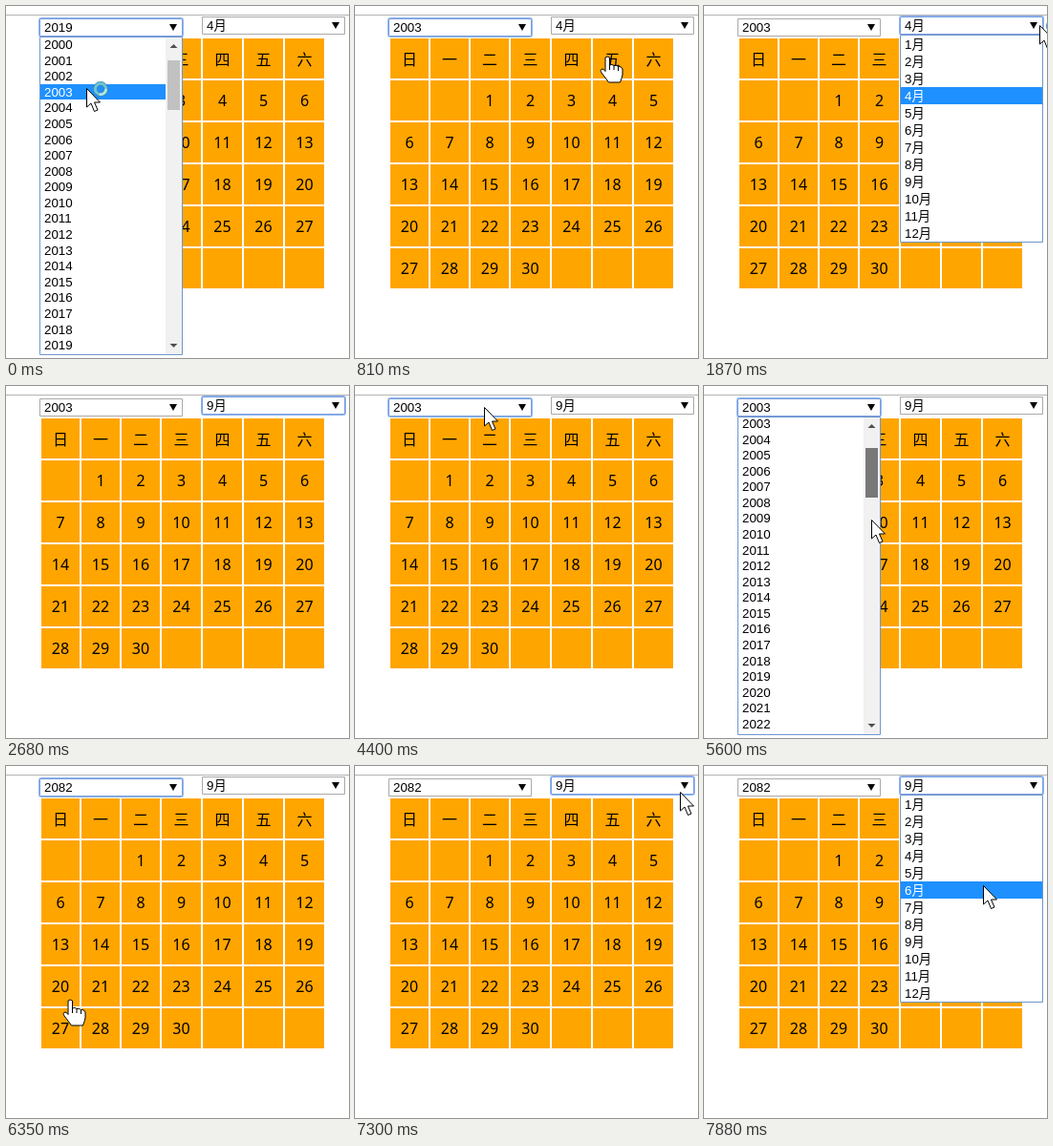
Write an HTML page with a canvas that moves like this. It is 359x369 px and loops after 8000 ms.

```html
<!DOCTYPE html>
<html lang="zh">
<head>
<meta charset="utf-8">
<title>Calendar</title>
<style>
  html, body { margin: 0; overflow: hidden; background: #fff; }
  canvas { display: block; }
</style>
</head>
<body>
<canvas id="stage" width="359" height="369"></canvas>
<script>
const ctx = document.getElementById('stage').getContext('2d');
const LOOP = 8000;
const UI_FONT = '13.33px "Liberation Sans", "Noto Sans CJK SC", "Noto Sans CJK", sans-serif';
const CELL_FONT = '16px "Noto Sans", "Noto Sans CJK SC", "Noto Sans CJK", sans-serif';
const FIRST_YEAR = 1997, YEAR_ROW = 16.58, MONTH_ROW = 18;
const YEAR = 0, MONTH = 1;

// The screen refreshes in bursts: [start, step, count]
const bursts = [
  [0, 1, 1], [120, 133, 8], [1200, 1, 1], [1600, 135, 3], [2020, 135, 5], [2680, 1, 1],
  [3860, 135, 5], [4560, 130, 3], [4980, 124, 5], [5600, 150, 3], [6050, 150, 3],
  [6480, 1, 1], [6880, 142.8, 8]
];

// [time, year, month, focused select, list open]
const states = [
  [0, 2019, 4, YEAR, true], [250, 2003, 4, YEAR, false], [1600, 2003, 4, MONTH, false],
  [1730, 2003, 4, MONTH, true], [2680, 2003, 9, MONTH, false], [4260, 2003, 9, YEAR, false],
  [4560, 2003, 9, YEAR, true], [6350, 2082, 9, YEAR, false], [7020, 2082, 9, MONTH, false],
  [7300, 2082, 9, MONTH, true]
];

// [time, x, y]; x = 999 is out of view
const pointerPath = [
  [0, 84, 86], [253, 84, 86], [1050, 354, 37], [1200, 999, 0],
  [1600, 355, 26], [1870, 351, 20], [2290, 300, 150], [2560, 288, 185], [2680, 999, 0],
  [3860, 240, 150], [4400, 135, 22], [4560, 135, 22], [4980, 175, 75], [5100, 175, 80],
  [5600, 175, 140], [5900, 176, 265], [6050, 120, 243], [6200, 67, 243], [6350, 67, 245],
  [6480, 999, 0], [6880, 352, 40], [7300, 335, 21], [7450, 335, 21], [7879, 292, 125]
];

// [time, rows scrolled]
const scrollPath = [[0, 3], [4500, 3], [4560, 0], [5100, 0], [5600, 6.07], [5900, 73]];

const arrow = new Path2D('M.5 .5V20L5 16L8.5 24.5L12 23L8.5 15H14.5Z');
const hand = new Path2D('M-2 1Q0 -1 2.5 1V9Q5 7.5 7 9.5Q9.5 8.5 11.5 10.5Q15 10 16 13V19' +
  'Q15.5 22 13.5 27H1.5Q-2 22 -6 17Q-8 13.5 -5 13Q-3.5 13 -2 15.5Z');
const fingers = new Path2D('M2.5 9v5M7 10v4M11.5 11v4');

const lastStarted = (list, t) => list.filter(item => item[0] <= t).pop();

function refreshTime(t) {
  const [start, step, count] = lastStarted(bursts, t);
  return start + Math.min(Math.floor((t - start) / step), count - 1) * step;
}

function along(path, t) {
  const a = lastStarted(path, t);
  const b = path[path.indexOf(a) + 1] || a;
  const k = a === b ? 0 : (t - a[0]) / (b[0] - a[0]);
  return a.slice(1).map((v, i) => v + (b[i + 1] - v) * k);
}

function rect(color, x, y, w, h) {
  ctx.fillStyle = color;
  ctx.fillRect(x, y, w, h);
}

function frame(color, x, y, w, h, radius = 0) {
  ctx.strokeStyle = color;
  ctx.lineWidth = 1;
  ctx.beginPath();
  ctx.roundRect(x + .5, y + .5, w - 1, h - 1, radius);
  ctx.stroke();
}

function label(text, x, y, color = '#000', font = UI_FONT, align = 'left') {
  ctx.font = font;
  ctx.textAlign = align;
  ctx.fillStyle = color;
  ctx.fillText(text, x, y);
}

function triangle(color, x, y, halfWidth, height) {
  ctx.fillStyle = color;
  ctx.beginPath();
  ctx.moveTo(x - halfWidth, y);
  ctx.lineTo(x + halfWidth, y);
  ctx.lineTo(x, y + height);
  ctx.fill();
}

function drawCalendar(year, month) {
  const offset = new Date(year, month - 1, 1).getDay();
  const days = new Date(year, month, 0).getDate();
  const left = col => 37 + 42 * col + Math.max(0, col - 3);
  for (let row = 0; row < 6; row++) {
    for (let col = 0; col < 7; col++) {
      const x = left(col), width = left(col + 1) - 2 - x, y = 34 + 44 * row;
      const day = (row - 1) * 7 + col - offset + 1;
      const text = row === 0 ? '日一二三四五六'[col] : day > 0 && day <= days ? day : '';
      rect('#ffa500', x, y, width, 42);
      label(text, x + width / 2, y + (row ? 27 : 28), '#000', CELL_FONT, 'center');
    }
  }
}

function drawSelect(x, y, text, focused) {
  rect('#fff', x, y, 150, 19);
  frame(focused ? '#7a9fdc' : '#a9a9a9', x, y, 150, 19);
  if (focused) frame('#8db4f2', x - 1, y - 1, 152, 21, 2);
  label(text, x + 5, y + 14);
  triangle('#000', x + 140, y + 6, 4, 7);
}

function drawRow(text, x, y, width, height, baseline, active) {
  if (active) rect('#1e90ff', x, Math.round(y), width, Math.round(height));
  label(text, x + 4, Math.round(y + baseline), active ? '#fff' : '#000');
}

function drawYearList(t, year, px, py) {
  const [scroll] = along(scrollPath, t);
  const top = 32.4, dragging = t > 5100 && t < 6000;
  let active = t > 4700 ? 1999 : year;
  if (px < 167 && py > 33) active = FIRST_YEAR + Math.floor(scroll + (py - top) / YEAR_ROW);
  rect('#fff', 35, 32, 150, 334);
  ctx.save();
  ctx.beginPath();
  ctx.rect(36, 33, 148, 332);
  ctx.clip();
  for (let i = Math.floor(scroll); i < scroll + 20.05; i++) {
    const value = FIRST_YEAR + i;
    drawRow(value, 36, top + (i - scroll) * YEAR_ROW, 131, 16, 12.7, value === active);
  }
  rect('#f1f1f1', 167, 33, 17, 332);
  rect(dragging ? '#787878' : '#c1c1c1', 169, Math.round(49.2 + 2.6 * scroll), 13, 52);
  triangle('#505050', 175.5, 44, 4, -4);
  triangle('#505050', 175.5, 354, 4, 4);
  ctx.restore();
  frame('#6f97cf', 35, 32, 150, 334);
}

function drawMonthList(month, px, py) {
  const active = px < 354 && py > 31 ? Math.floor((py - 31) / MONTH_ROW) : month - 1;
  rect('#fff', 205, 30, 150, 218);
  for (let i = 0; i < 12; i++) {
    drawRow(i + 1 + '月', 206, 31 + i * MONTH_ROW, 148, MONTH_ROW, 14, i === active);
  }
  frame('#6f97cf', 205, 30, 150, 218);
}

function drawBusyRing(t) {
  const ring = (color, width, from, to) => {
    ctx.strokeStyle = color;
    ctx.lineWidth = width;
    ctx.beginPath();
    ctx.arc(15, 1, 5.7, from, to);
    ctx.stroke();
  };
  const turn = t / 160;
  ring('#3c88ae', 4.5, 0, 7);
  ring('#70c4d4', 3, 0, 7);
  ring('#b5e8dc', 2.5, turn, turn + 1.8);
}

function drawPointer(t, x, y, listOpen) {
  const overCells = !listOpen && x > 36 && x < 333 && y > 34 && y < 296;
  ctx.save();
  ctx.translate(Math.round(x), Math.round(y));
  ctx.fillStyle = '#fff';
  ctx.strokeStyle = '#000';
  ctx.lineWidth = 1;
  ctx.lineJoin = 'round';
  const shape = overCells ? hand : arrow;
  ctx.fill(shape);
  ctx.stroke(shape);
  if (overCells) ctx.stroke(fingers);
  else if (t < 2600) drawBusyRing(t);
  ctx.restore();
}

function draw(now) {
  const t = refreshTime(now % LOOP);
  const [, year, month, focus, open] = lastStarted(states, t);
  const [px, py] = along(pointerPath, t);
  rect('#fff', 0, 0, 359, 369);
  rect('#b4b4b4', 0, 9, 359, 1);
  drawCalendar(year, month);
  drawSelect(35, 13, year, focus === YEAR);
  drawSelect(205, 11, month + '月', focus === MONTH);
  if (open && focus === YEAR) drawYearList(t, year, px, py);
  if (open && focus === MONTH) drawMonthList(month, px, py);
  drawPointer(t, px, py, open);
}

const begin = performance.now();
function tick() {
  draw(performance.now() - begin);
  requestAnimationFrame(tick);
}
tick();
</script>
</body>
</html>
```
